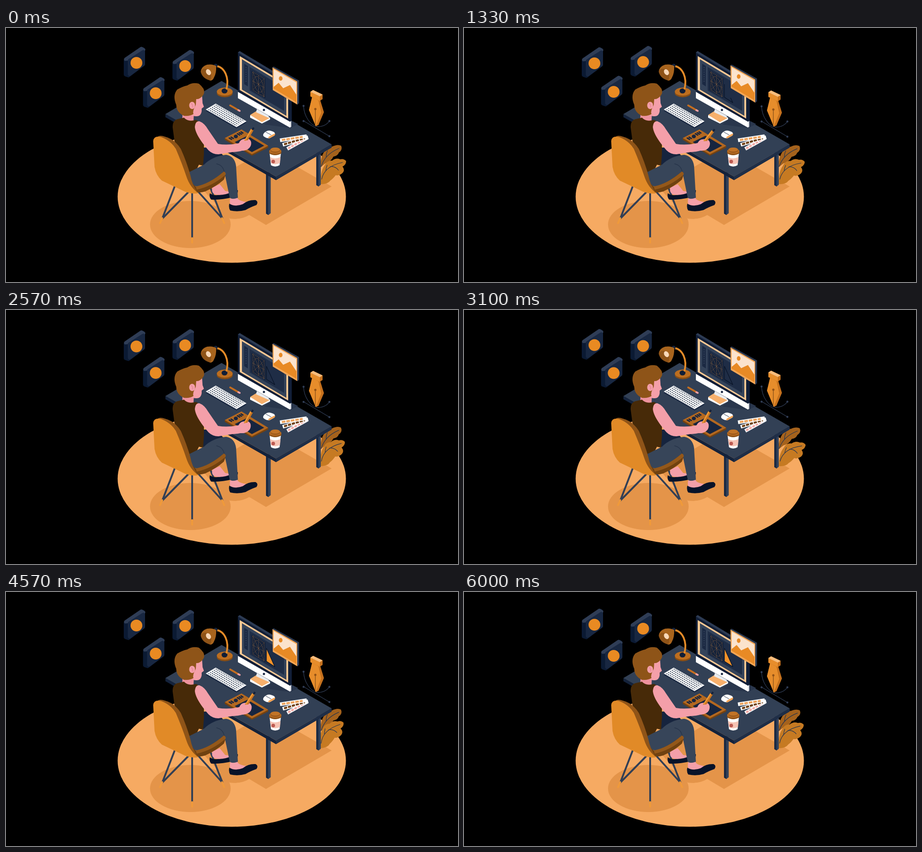
An HTML page that plays this animation: 998 by 561 pixels, repeating every 6.03 s.

```html
<!DOCTYPE html>
<html lang="en">
<head>
<meta charset="utf-8">
<title>Designer at a desk</title>
<style>
html, body { margin: 0; width: 100%; height: 100%; overflow: hidden; background: #000; }
svg { display: block; width: 100vw; height: 100vh; }
.move { animation: 6.03s ease-in-out infinite; }
.tile-a { animation-name: tile-a; }
.tile-b { animation-name: tile-b; }
.tile-c { animation-name: tile-c; }
.card { animation-name: card; }
.nib { animation-name: nib; }
.hand { animation-name: hand; transform-origin: 529px 256px; }
.leaf-s { animation-name: leaf-s; transform-origin: 697px 305px; }
.leaf-l { animation-name: leaf-l; transform-origin: 697px 345px; }
.outline { animation-name: outline; animation-timing-function: linear; stroke-dasharray: 1; }
.wipe { animation-name: wipe; animation-timing-function: linear; transform-origin: 574px 0; }

@keyframes tile-a {
  0% { translate: 0 0 } 6% { translate: 0 2px } 13.8% { translate: 0 1px }
  30.3% { translate: 0 1px } 42.6% { translate: 0 3.5px } 60.2% { translate: 0 -2.5px }
  75.8% { translate: 0 -3px } 97%, 100% { translate: 0 -4.8px }
}
@keyframes tile-b {
  0% { translate: 0 0 } 13.8% { translate: 0 0 } 20% { translate: 0 -9px }
  30.3% { translate: 0 -8px } 42.6% { translate: 0 -6px } 60.2% { translate: 0 -3px }
  75.8% { translate: 0 -9px } 99.5%, 100% { translate: 0 -3px }
}
@keyframes tile-c {
  0% { translate: 0 0 } 13.8% { translate: 0 -4px } 30.3% { translate: 0 -2px }
  42.6% { translate: 0 -5px } 60.2% { translate: 0 -4.5px } 75.8% { translate: 0 -8px }
  99.5%, 100% { translate: 0 -3px }
}
@keyframes card {
  0% { translate: 0 0 } 13.8% { translate: 0 -4px } 30.3% { translate: 0 -4.5px }
  42.6% { translate: 0 -12px } 60.2% { translate: 0 3px } 75.8% { translate: 0 -5px }
  99.5%, 100% { translate: 0 -4px }
}
@keyframes nib {
  0% { translate: 0 0 } 13.8% { translate: 0 -1px } 30.3% { translate: 0 3px }
  42.6% { translate: 0 -2.5px } 60.2% { translate: 0 -3.5px } 75.8% { translate: 0 4px }
  99.5%, 100% { translate: 0 5px }
}
@keyframes hand {
  0% { translate: 0 0; rotate: 0deg } 13.8% { translate: 1px 3px; rotate: 11deg }
  30.3% { translate: 2px -1px; rotate: 5deg } 42.6%, 60.2% { translate: -1px 1px; rotate: -1deg }
  75.8%, 100% { translate: 1px 0; rotate: 3deg }
}
@keyframes leaf-s {
  0% { rotate: 0deg } 13.8% { rotate: 4deg } 30.3% { rotate: -2deg } 42.6% { rotate: -.5deg }
  60.2% { rotate: 4deg } 75.8% { rotate: -.5deg } 99.5%, 100% { rotate: 2deg }
}
@keyframes leaf-l {
  0% { rotate: 0deg } 7% { rotate: 2deg } 13.8% { rotate: -2deg } 19% { rotate: 2deg }
  30.3% { rotate: -1deg } 42.6% { rotate: -3deg } 56% { rotate: 6deg } 60.2% { rotate: 4deg }
  75.8% { rotate: -6deg } 89% { rotate: 3deg } 99.5%, 100% { rotate: -1deg }
}
@keyframes outline {
  0%, 7% { stroke-dashoffset: 1 } 30%, 100% { stroke-dashoffset: 0 }
}
@keyframes wipe {
  0%, 53% { scale: 0 1 } 60.2% { scale: .72 1 } 66%, 100% { scale: 1 1 }
}
</style>
</head>
<body>
<svg viewBox="0 0 998 561" stroke-linejoin="round" stroke-linecap="round">
  <defs>
    <g id="tile">
      <path d="M264 71L300 46L303 47V80L270 105L264 103Z" fill="#0b1a33" stroke="#0b1a33" stroke-width="8"/>
      <path d="M264 69L299 45L304 48L272 68Z" fill="#2f3d56" stroke="#2f3d56" stroke-width="7"/>
      <path d="M273 72L303 53V80L273 102Z" fill="#182741" stroke="#182741" stroke-width="8"/>
      <circle cx="288" cy="77" r="13" fill="#e98a22"/>
    </g>
    <clipPath id="fill"><rect class="move wipe" x="574" y="118" width="21" height="52"/></clipPath>
  </defs>

  <!-- floor and shadows -->
  <ellipse cx="498.5" cy="372.5" rx="252" ry="146" fill="#f6aa62"/>
  <g fill="#e49449">
    <path d="M719 350L574 435L537 413Q520 424 494 421L430 352L575 268Z"/>
    <ellipse cx="407" cy="434" rx="89" ry="52"/>
  </g>

  <!-- plant -->
  <g class="move leaf-s" fill="none" stroke="#26344e" stroke-width="1.2">
    <path d="M694 308Q694 283 705 270Q711 260 720 262Q732 256 740 260Q744 269 735 275Q733 282 723 284Q717 296 705 299Z" fill="#a5621c" stroke="none"/>
    <path d="M696 306Q704 279 735 266M707 285Q707 276 710 271"/>
  </g>
  <g class="move leaf-l" fill="none" stroke="#26344e" stroke-width="1.2">
    <path d="M695 345Q693 318 703 304Q708 292 720 293Q729 286 738 290Q746 288 751 294Q751 302 743 306Q750 315 741 322Q733 327 728 325Q722 333 716 337Q711 345 695 345Z" fill="#c67a22" stroke="none"/>
    <path d="M697 334Q703 305 743 297M706 316Q707 308 709 303M716 306Q727 305 734 314"/>
  </g>

  <!-- floating tiles -->
  <g class="move tile-a"><use href="#tile"/></g>
  <g class="move tile-b"><use href="#tile" x="107.5" y="7"/></g>
  <g class="move tile-c"><use href="#tile" x="42.5" y="67"/></g>

  <!-- desk -->
  <path d="M574 318H584V409L579 413L574 410Z" fill="#1b2a43"/>
  <path d="M579 322H584.500V409L579 413Z" fill="#33425a"/>
  <path d="M685 270H695V346L690 350L685 347Z" fill="#1b2a43"/>
  <path d="M690 270H695V346L690 350Z" fill="#33425a"/>
  <path d="M352 190L596 328L719 257V264L596 336L352 197Z" fill="#14223b"/>
  <path d="M596 328L719 257V264L596 336Z" fill="#1f2e47"/>
  <path d="M352 190L476 117L719 257L596 328Z" fill="#324055"/>

  <!-- lamp -->
  <ellipse cx="483" cy="144" rx="17.500" ry="9" fill="#8b4f14"/>
  <ellipse cx="483" cy="140.500" rx="17.500" ry="9" fill="#bd6e1f"/>
  <ellipse cx="482.500" cy="139" rx="6.500" ry="5.500" fill="#111e36"/>
  <path d="M487 134C493 110 483 87 465 84" fill="none" stroke="#e48b28" stroke-width="4"/>
  <circle cx="463" cy="83" r="4" fill="#14223b"/>
  <path d="M430 97Q431 85 444 81Q456 79 464 84Q465 99 459 110Q456 117 450 116Z" fill="#a8641d"/>
  <path d="M430 97Q434 86 447 92Q457 102 451 116Q434 112 430 97Z" fill="#8e5318"/>
  <ellipse cx="447" cy="97.500" rx="5" ry="7" transform="rotate(-30 447 97.500)" fill="#f8d8b8"/>

  <!-- monitor -->
  <path d="M570 213L628 221L645 212L600 190Z" fill="#29364c"/>
  <path d="M512 54L516 51L631 120V217L627 220L512 154Z" fill="#111e37"/>
  <path d="M516 51L631 120L627 123L512 54Z" fill="#2d3b53"/>
  <path d="M512 141L627 207V220L512 155Z" fill="#fff"/>
  <path d="M627 207L630 205V218L627 220Z" fill="#d9dce2"/>
  <path d="M516 62L623 126V200L516 137Z" fill="#f9c893"/>
  <path d="M521 69L619 128V194L521 136Z" fill="#34435a"/>
  <path d="M526 79L534 84V129L526 124Z" fill="#1b2943"/>
  <path d="M530 87V120" stroke="#34435a" stroke-width="2" stroke-dasharray="1 4"/>
  <path d="M538 86L614 132V183L538 138Z" fill="#1f2d46"/>
  <path d="M542 94L573 112V155L542 137Z" fill="#14223a"/>
  <g fill="none" stroke="#c98543" stroke-width=".8" stroke-dasharray="1.500 2" stroke-linecap="butt">
    <path d="M545 97L570 112V152L545 137ZM545 97L570 152M570 112L545 137M557.500 104V145M545 117L570 132"/>
    <ellipse cx="557.500" cy="124.500" rx="9" ry="18" transform="rotate(-18 557.500 124.500)"/>
  </g>
  <path d="M575 124V153L593 164.500Z" fill="#f3932a" clip-path="url(#fill)"/>
  <path class="move outline" pathLength="1" d="M575 124V153L593.500 165Z" fill="none" stroke="#081326" stroke-width="1.200" stroke-linecap="butt"/>
  <circle cx="569.500" cy="181" r="2.500" fill="#1a2842"/>
  <path d="M539 193L553 184L583 198V202L565 211L539 198Z" fill="#fff"/>
  <path d="M539 192L552 184L582 199L565 208Z" fill="#f7b06c"/>
  <path d="M554 179L580 194L581 199L552 186Z" fill="#e9ebee"/>

  <!-- picture card -->
  <g class="move card">
    <path d="M588 87L591 85L647 116V166L644 169L589 137Z" fill="#2b3951"/>
    <path d="M588.500 87L643 118V169L589 137Z" fill="#f4a553"/>
    <path d="M591 91L641 120V164L591 134Z" fill="#fbe3cd"/>
    <path d="M591 130L602 121L612 133L627 126L641 147V164L591 134Z" fill="#e88a25"/>
    <ellipse cx="606.500" cy="111.500" rx="4" ry="5" fill="#e88a25"/>
  </g>

  <!-- nib and curve handles -->
  <g class="move nib">
    <g fill="none" stroke="#303d55" stroke-width="1.300">
      <path d="M657 205L714 239M657 172C658 196 673 216 688 218C702 218 711 211 714 205"/>
    </g>
    <g fill="#303d55">
      <circle cx="657" cy="172" r="2.300"/><circle cx="657" cy="205.500" r="2.300"/>
      <circle cx="714" cy="205.500" r="2.300"/><circle cx="714" cy="239" r="2.300"/>
    </g>
    <path d="M676 152L669 181L684 217L690 214L702 186L694 160Z" fill="#c4701d"/>
    <path d="M676 152L669 181L684 217L696 187L690 160Z" fill="#e78d2b"/>
    <path d="M683 181V212" stroke="#643a12" stroke-width="1"/>
    <circle cx="683" cy="179" r="2.500" fill="#945317"/>
    <path d="M672 141L678 137L699 147V157L693 161L672 151Z" fill="#c4701d"/>
    <path d="M672 141L693 151V161L672 151Z" fill="#e78d2b"/>
    <path d="M672 141L678 137L699 147L693 151Z" fill="#f8bc7c"/>
  </g>

  <!-- keyboard, pencil, mouse -->
  <path d="M441 181L463 168L531 207L509 220Z" fill="#1a2842" transform="translate(0 2)"/>
  <path d="M441 180L463 167L531 206L509 219Z" fill="#fff"/>
  <g stroke="#324055" stroke-width="2" stroke-dasharray="2.400 2" stroke-linecap="butt">
    <path d="M447 180L509 215.500M451 177.500L513 213M455 175L517 210.500M459 172.500L521 208M463 170L525 205.500"/>
  </g>
  <path d="M495 171L514 182" stroke="#c46e20" stroke-width="4"/>
  <path d="M513 181.500L516 183" stroke="#f3a0a6" stroke-width="4"/>
  <path d="M568 235Q570 230 577 227Q583 225 592 230Q596 234 592 238L583 243Q577 245 570 240Q567 238 568 235Z" fill="#fff"/>
  <path d="M579 241Q588 235 594 233Q595 236 592 238L583 243Q579 245 579 241Z" fill="#f3a252"/>
  <path d="M574 230L585 236" stroke="#29364c" stroke-width="1"/>

  <!-- swatches -->
  <g stroke-linecap="butt" fill="none">
    <path d="M621 267L666 242" stroke="#fff" stroke-width="8"/>
    <path d="M623 266L660 245" stroke="#f3a9a5" stroke-width="4.500" stroke-dasharray="6 2"/>
    <path d="M611 258L667 241" stroke="#fff" stroke-width="8"/>
    <path d="M614 257L660 243" stroke="#704016" stroke-width="4.500" stroke-dasharray="7 2"/>
    <path d="M605 248L664 239" stroke="#fff" stroke-width="8"/>
    <path d="M609 247.500L655 240.500" stroke="#eda35e" stroke-width="4.500" stroke-dasharray="8 2"/>
  </g>

  <!-- cup -->
  <path d="M582 276H607L604 303Q594 309 585 303Z" fill="#fff"/>
  <path d="M583 285Q594 291 606 285L605 298Q594 304 585 298Z" fill="#f6c3b4"/>
  <circle cx="590" cy="295" r="4" fill="#bd5b52"/>
  <path d="M581 272V277Q594 285 608 277V272Z" fill="#8f5217"/>
  <ellipse cx="594.500" cy="272" rx="13.500" ry="6" fill="#b56a22"/>
  <path d="M584 268V272Q594 279 605 272V268Z" fill="#99581a"/>
  <ellipse cx="594.500" cy="268.500" rx="10.500" ry="4.500" fill="#c27427"/>

  <!-- tablet -->
  <path d="M483 244L520 225L579 261V264L543 282L483 247Z" fill="#75420f"/>
  <path d="M483 243L520 224L579 260L543 279Z" fill="#b36820"/>
  <path d="M505 252L533 238L570 260L543 274Z" fill="#17253f"/>
  <g stroke="#17253f" stroke-width="3">
    <path d="M493 243L498 246M497 241L502 244M511 233.500L516 236.500M515 231.500L520 234.500M519 229.500L523 232"/>
    <ellipse cx="507.500" cy="239.500" rx="3" ry="2.500" fill="#17253f"/>
  </g>

  <!-- chair legs -->
  <g stroke="#323f55" stroke-width="4" stroke-linecap="butt">
    <path d="M374 346L345 421M405 360L345 421M411 360V465M423 360L477 420M451 352L478 421"/>
  </g>
  <path d="M345 420L340 431M477 420L482 431M411 464V474" stroke="#f09a3a" stroke-width="4"/>

  <!-- far leg -->
  <path d="M425 268L437 264H463L482 284L436 305Z" fill="#16243e"/>
  <path d="M450 365Q460 373 481 366L512 358Q513 369 499 374Q477 380 453 379Q448 373 450 365Z" fill="#081329"/>
  <path d="M456 352L472 345L484 360L499 362Q480 371 463 368Q452 364 456 352Z" fill="#f49fa9"/>

  <!-- body -->
  <path d="M390 185H415L414 206Q401 210 389 204Z" fill="#ee929e"/>
  <path d="M368 220Q367 204 380 201L393 198Q402 208 419 203Q432 207 437 230V279L435 304L426 302L414 326L396 310L372 250Z" fill="#472a08"/>
  <path d="M482 317L446 345Q418 356 411 344Q405 332 403 319L437 302Q456 283 486 280Q505 283 508 305L512 375Q502 380 494 375Z" fill="#374559"/>
  <path d="M482 318Q479 303 465 300" fill="none" stroke="#27354a" stroke-width="1.300"/>
  <path d="M495 376Q503 379 511 375Q513 382 530 384Q522 397 500 394Q492 390 495 376Z" fill="#f49fa9"/>
  <path d="M493 388Q506 396 523 389Q535 379 551 380Q558 384 553 391Q539 396 529 402Q512 407 495 403Q491 397 493 388Z" fill="#081329"/>

  <!-- chair seat -->
  <path d="M402 319Q407 343 419 350Q445 347 481 317Q487 323 481 335Q464 350 440 361Q423 366 411 360Z" fill="#704110"/>
  <path d="M419 350Q450 344 481 317Q486 319 485 324Q455 350 421 357Z" fill="#94581a"/>
  <path d="M333 242Q338 235 351 240Q372 245 386 267Q399 296 407 325Q411 346 422 362L411 364Q392 327 381 287Z" fill="#8f5418"/>
  <path d="M325 250Q326 237 343 241Q364 249 375 267Q389 300 398 327Q406 352 425 365Q405 368 386 357L344 337Q331 325 328 307Z" fill="#e18a27"/>

  <!-- head -->
  <path d="M404 150H433L434 166L437 174L432 178Q433 190 426 194Q418 197 405 191Z" fill="#f49fa9"/>
  <path d="M393 194Q376 186 376 170Q367 149 378 136Q390 129 400 127Q412 119 426 123Q432 128 436 134Q440 143 434 150Q427 158 420 157L419 170Q411 184 414 190Q407 195 393 194Z" fill="#8e5418"/>
  <ellipse cx="411" cy="171" rx="6.500" ry="8" fill="#f49fa9"/>
  <path d="M409 167Q413 169 412 175" fill="none" stroke="#df7f8d" stroke-width="1.200"/>

  <!-- arm -->
  <path d="M417 219Q418 205 427 206Q438 210 446 224L468 256Q490 260 516 254L526 250Q538 253 534 265Q525 273 500 274L469 279Q456 279 447 270Q419 238 417 219Z" fill="#f49fa9"/>
  <g class="move hand">
    <path d="M514 255Q517 246 526 245Q538 242 541 251Q543 261 535 267Q526 273 515 270Z" fill="#f49fa9"/>
    <g stroke-linecap="butt">
      <path d="M529 250L544 224" stroke="#c87521" stroke-width="6.500"/>
      <path d="M528 248L542 224" stroke="#ed9936" stroke-width="3"/>
      <path d="M544 225L547 220" stroke="#14223b" stroke-width="4"/>
    </g>
    <path d="M523 252Q531 246 539 249Q542 257 534 260Q527 259 523 252Z" fill="#f49fa9"/>
  </g>
</svg>
</body>
</html>
```
